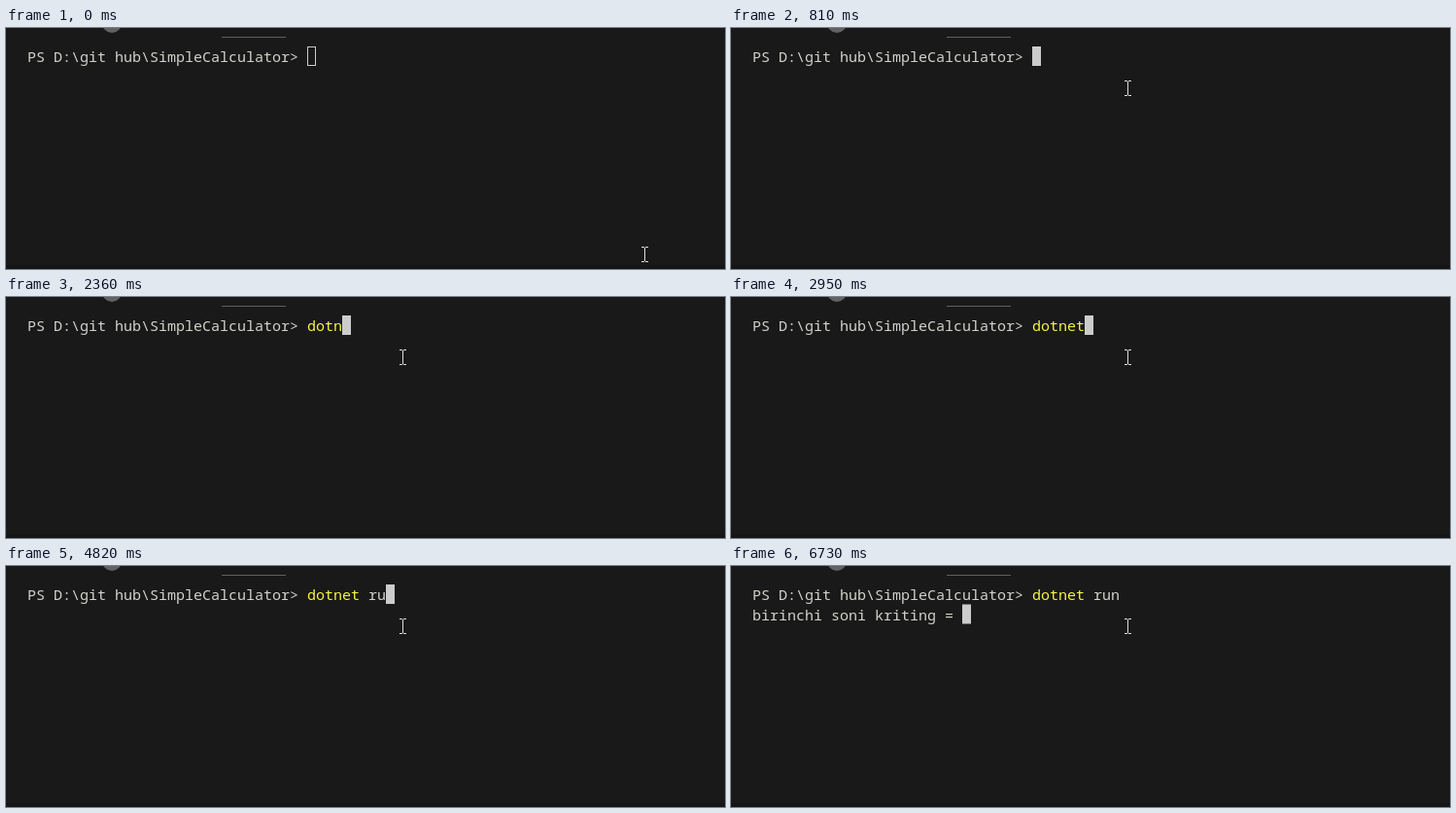
An HTML page that plays this animation: 740 px wide and 248 px high, repeating every 8 s.

```html
<!DOCTYPE html>
<html lang="en">
<head>
<meta charset="utf-8">
<title>Terminal</title>
<style>
  html, body { margin: 0; width: 100%; height: 100%; overflow: hidden; background: #191919; }
  svg { display: block; }
  text { font: 15px "Noto Sans Mono", "DejaVu Sans Mono", monospace; fill: #d2d2cc; white-space: pre; }
</style>
</head>
<body>
<svg width="740" height="248" viewBox="0 0 740 248">
  <rect width="740" height="248" fill="#191919"/>
  <rect y="244" width="740" height="4" fill="#151515"/>
  <circle cx="109" cy="-5" r="10" fill="#626262"/>
  <rect x="222" y="9" width="66" height="1" fill="#606060"/>
  <rect id="hollow" x="310.5" y="19.5" width="8" height="19" fill="none" stroke="#cccccc"/>
  <rect id="block" width="9" height="20" fill="#cccccc"/>
  <text x="22" y="35">PS D:\git hub\SimpleCalculator<tspan id="mark">&gt;</tspan></text>
  <text x="310" y="35"><tspan id="command"></tspan><tspan id="args"></tspan></text>
  <text id="output" x="22" y="56"></text>
  <circle id="click" r="12" fill="#858510"/>
  <path id="pointer" d="M-3 .5h3M1 .5h3M.5 1v14M-3 15.5h3M1 15.5h3" fill="none" stroke="#dedede"/>
</svg>
<script>
  const LOOP = 8000, STEP = 67, CELL = 9;
  const YELLOW = "#f5f543", GREEN = "#23d18b", RED = "#f14c4c", PLAIN = "#d2d2cc";
  const OUTPUT = "birinchi soni kriting = ";
  const ENTER = 5280, PRINT = 6730;
  const typing = [
    [0, ""], [1560, "d"], [1820, "do"], [2090, "dot"], [2360, "dotn"],
    [2820, "dotne"], [2950, "dotnet"], [3210, "dotnet "], [3480, "dotnet r"],
    [3740, "dotnet ri"], [4470, "dotnet r"], [4820, "dotnet ru"], [5020, "dotnet run"]
  ];
  const $ = id => document.getElementById(id);
  const [hollow, block, mark, command, args, output, click, pointer] =
    ["hollow", "block", "mark", "command", "args", "output", "click", "pointer"].map($);
  const clamp = v => Math.max(0, Math.min(1, v));
  const mix = (a, b, p) => Math.round(a + (b - a) * p);
  const show = (el, on) => el.setAttribute("visibility", on ? "visible" : "hidden");
  const place = (el, x, y) => el.setAttribute("transform", `translate(${x} ${y})`);

  function drawPointer(t) {
    const k = Math.floor(t / STEP);
    const p = clamp(k / 7);
    const travel = p * p * (3 - 2 * p);
    const drift = clamp((k - 7) / 5);
    const x = k < 8 ? mix(657, 404, travel) : mix(404, 408, drift);
    const y = k < 8 ? mix(225, 56, travel) : mix(56, 54, drift);
    const focused = k >= 7;
    place(pointer, x, y);
    place(click, x - 2, y + 7);
    show(click, focused && k < 10);
    show(hollow, !focused);
    show(block, focused);
  }

  function drawTerminal(t) {
    const typed = typing.filter(([at]) => at <= t).pop()[1];
    const keyword = typed === "do";
    command.textContent = typed.slice(0, 6);
    args.textContent = typed.slice(6);
    command.style.fill = keyword ? GREEN : YELLOW;
    mark.style.fill = keyword ? RED : PLAIN;
    output.textContent = t >= PRINT ? OUTPUT : "";
    if (t >= ENTER) place(block, 22 + CELL * output.textContent.length, 39.5);
    else place(block, 310 + CELL * typed.length, 19);
  }

  const start = performance.now();
  function frame() {
    const t = (performance.now() - start) % LOOP;
    drawPointer(t);
    drawTerminal(t);
    requestAnimationFrame(frame);
  }
  frame();
</script>
</body>
</html>
```
